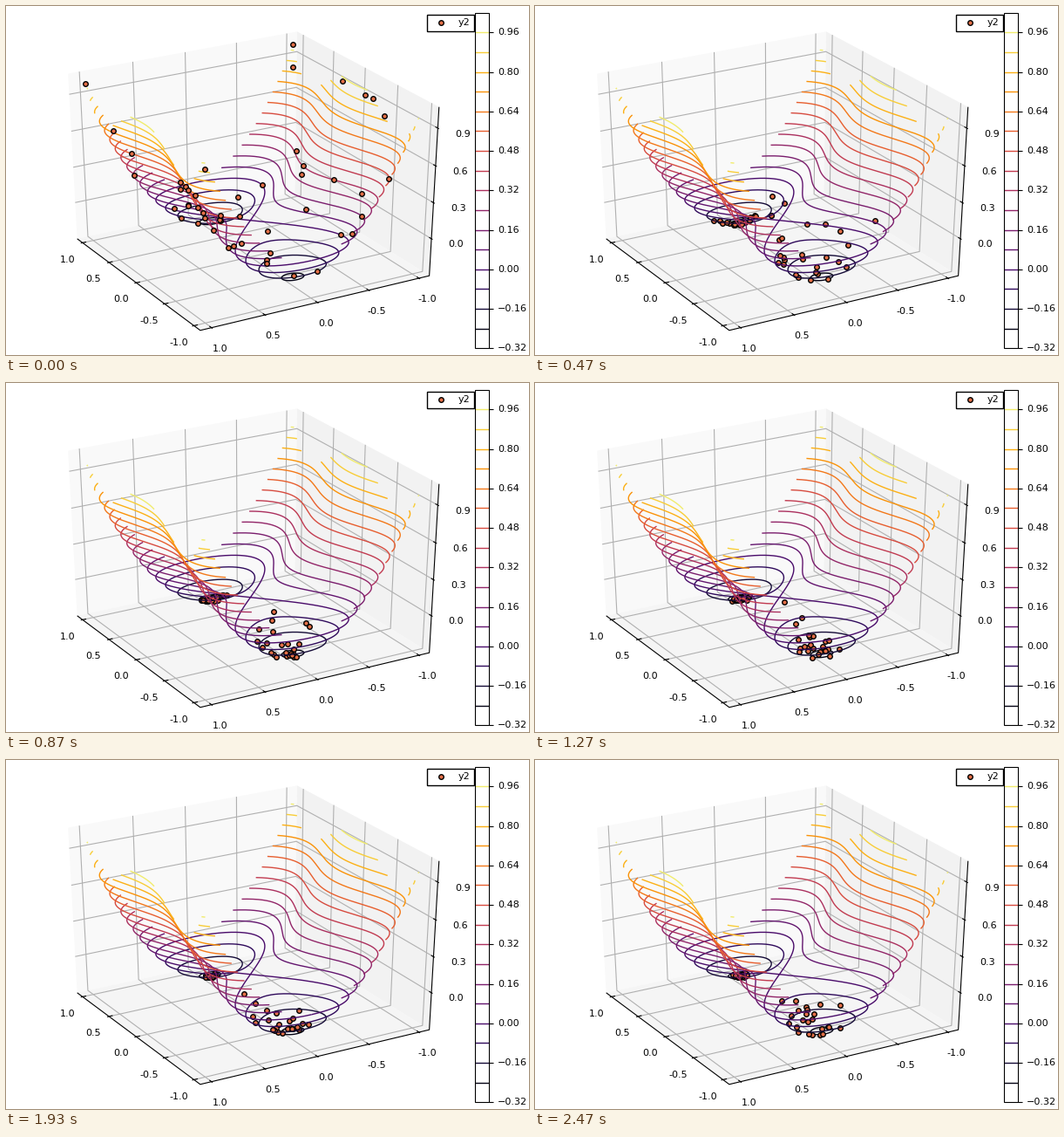
Animation of 600 by 400 pixels, one loop 2510 ms. Source, as a matplotlib script:

```python
import matplotlib.pyplot as plt
import numpy as np
from matplotlib.animation import FuncAnimation
from matplotlib.patches import Rectangle

WIDTH, HEIGHT, DPI = 600, 400, 100
FRAMES, LOOP_MS = 75, 2510
AZIM, ELEV, DIST = np.radians(150), np.radians(30), 10
CENTER, SCALE = (280.4, 194.45), (2912, 2119.6)
Z_MID, Z_RANGE, XY_RANGE = 0.375, 1.325, 2.12
EDGE = 0.5 + 1 / 48          # panes reach a little past the limits
COUNT, DT, PULL = 50, 0.04, 0.2
WELL = np.array([0.707, 0.0])
RED = "#e36f47"
GRAY = "#b0b0b0"


def height(x, y):
    return x**4 - x**2 + y**2


def project(x, y, z):
    """Unit-cube coordinates to screen x, screen y and depth."""
    side = -np.sin(AZIM) * x + np.cos(AZIM) * y
    away = -np.cos(AZIM) * x - np.sin(AZIM) * y
    up = z * np.cos(ELEV) + away * np.sin(ELEV)
    depth = away * np.cos(ELEV) - z * np.sin(ELEV)
    far = DIST + depth
    return (CENTER[0] + SCALE[0] * side / far,
            CENTER[1] - SCALE[1] * up / far, depth)


def norm_z(z):
    return (z - Z_MID) / Z_RANGE


def on_surface(x, y):
    return project(x / XY_RANGE, y / XY_RANGE, norm_z(height(x, y)))


def scatter_starts(rng):
    """A few dots high on the walls, the rest spread evenly along x."""
    high = np.array([(1, 1), (1, -1), (0.94, -0.97), (1, 0.76), (-0.98, 0.97),
                     (0.15, -0.98), (-0.2, -0.98), (-0.3, -1), (-0.47, -1)])
    rest = COUNT - len(high)
    x = rng.permutation(np.linspace(-1, 1, rest))
    y = rng.uniform(-0.85, 0.75, rest)
    return np.vstack([high, np.column_stack([x, y])])


def simulate():
    """Noisy descent; the noise grows with the distance from one well."""
    rng = np.random.default_rng(12)
    pos = scatter_starts(rng)
    path = [pos]
    for _ in range(FRAMES - 1):
        x, y = pos.T
        slope = np.column_stack([4 * x**3 - 2 * x, 2 * y])
        offset = pos - WELL
        sigma = 0.05 + 0.14 * np.hypot(*offset.T)[:, None]
        step = -(slope + PULL * offset) * DT
        step += sigma * np.sqrt(DT) * rng.standard_normal(pos.shape)
        pos = np.clip(pos + step, -1, 1)
        path.append(pos)
    return path


fig = plt.figure(figsize=(WIDTH / DPI, HEIGHT / DPI), dpi=DPI, facecolor="white")
ax = fig.add_axes([0, 0, 1, 1])


def line(points, color="black", lw=0.8, z=2.0):
    xs, ys = zip(*points)
    ax.plot(xs, ys, color=color, lw=lw, zorder=z, solid_capstyle="butt")


def line3d(*points, **style):
    line([project(*p)[:2] for p in points], **style)


def label(x, y, text, ha="center"):
    ax.text(x, y, text, fontsize=8, family="DejaVu Sans", ha=ha, va="center",
            zorder=30)


def tick(point, axis, text, shift):
    """Short mark across the edge along the given axis, and its label."""
    ends = []
    for reach in (1 / 120, -1 / 60):
        end = list(point)
        end[axis] += reach * np.sign(point[axis])
        ends.append(end)
    line3d(*ends, z=3)
    x, y, _ = project(*point)
    label(x + shift[0], y + shift[1], text)


def draw_box():
    e = EDGE
    panes = [
        ("#f9f9f9", [(e, e, -e), (e, -e, -e), (e, -e, e), (e, e, e)]),
        ("#f2f2f2", [(e, -e, -e), (-e, -e, -e), (-e, -e, e), (e, -e, e)]),
        ("#f5f5f5", [(e, e, -e), (-e, e, -e), (-e, -e, -e), (e, -e, -e)]),
    ]
    for color, corners in panes:
        ax.fill(*zip(*[project(*c)[:2] for c in corners]), color=color, lw=0, zorder=0)

    for v in (1.0, 0.5, 0.0, -0.5, -1.0):
        n = v / XY_RANGE
        line3d((n, e, -e), (n, -e, -e), (n, -e, e), color=GRAY, z=1)
        line3d((-e, n, -e), (e, n, -e), (e, n, e), color=GRAY, z=1)
        tick((n, e, -e), 1, f"{v:.1f}", (-17.7, 19.2))
        tick((-e, n, -e), 0, f"{v:.1f}", (9.4, 24))
    for v in (0.0, 0.3, 0.6, 0.9):
        n = norm_z(v)
        line3d((e, e, n), (e, -e, n), (-e, -e, n), color=GRAY, z=1)
        tick((-e, -e, n), 0, f"{v:.1f}", (28.4, 6.7))
    line3d((e, e, -e), (-e, e, -e), (-e, -e, -e), (-e, -e, e))


def level_color(level):
    return plt.cm.inferno(float(norm_z(level) + 0.5))


def draw_contours(levels):
    side = np.linspace(-1, 1, 201)
    gx, gy = np.meshgrid(side, side)
    flat = ax.contour(gx, gy, height(gx, gy), levels=levels)
    groups = flat.allsegs
    flat.remove()
    for level, group in zip(levels, groups):
        curves = [project(s[:, 0] / XY_RANGE, s[:, 1] / XY_RANGE, norm_z(level))
                  for s in group if len(s) > 1]
        if not curves:
            continue
        near = min(depth.min() for _, _, depth in curves)
        for x, y, _ in curves:
            line(list(zip(x, y)), level_color(level), 1, 10 - near)


def draw_colorbar(levels):
    left, right, top, bottom = 538, 554, 7.87, 392.13
    size = right - left, bottom - top
    ax.add_patch(Rectangle((left, top), *size, fc="white", ec="none", zorder=20))
    ax.add_patch(Rectangle((left, top), *size, fc="none", ec="black", lw=0.8,
                           zorder=23))

    def bar_y(level):
        return bottom - (level + 0.32) / 1.36 * (bottom - top)

    for level in levels:
        y = bar_y(level)
        line([(left, y), (right, y)], level_color(level), 1, 21)
    for i in range(-2, 7):
        y = bar_y(i * 0.16)
        line([(right, y), (right + 4.9, y)], z=22)
        label(right + 10, y, f"{i * 0.16:.2f}".replace("-", "\u2212"), "left")


def draw_legend():
    ax.add_patch(Rectangle((483, 10), 54, 19, fc="white", ec="black", lw=1,
                           zorder=24))
    ax.scatter([499], [19], s=16, c=RED, edgecolors="black", linewidths=1, zorder=25)
    label(519, 19.3, "y2", "left")


levels = np.arange(-3, 13) * 0.08
draw_box()
draw_contours(levels)
draw_colorbar(levels)
draw_legend()
path = simulate()
dots = ax.scatter([], [], s=16, c=RED, edgecolors="black", linewidths=1)
ax.set_xlim(0, WIDTH)
ax.set_ylim(HEIGHT, 0)
ax.axis("off")


def draw(i):
    x, y, depth = on_surface(*path[i].T)
    dots.set_offsets(np.column_stack([x, y]))
    # The cloud is sorted among the curves by its nearest dot.
    dots.set_zorder(10 - depth.min())
    return [dots]


anim = FuncAnimation(fig, draw, frames=FRAMES, init_func=lambda: draw(0),
                     interval=LOOP_MS / FRAMES, repeat=True)
plt.show()
```
